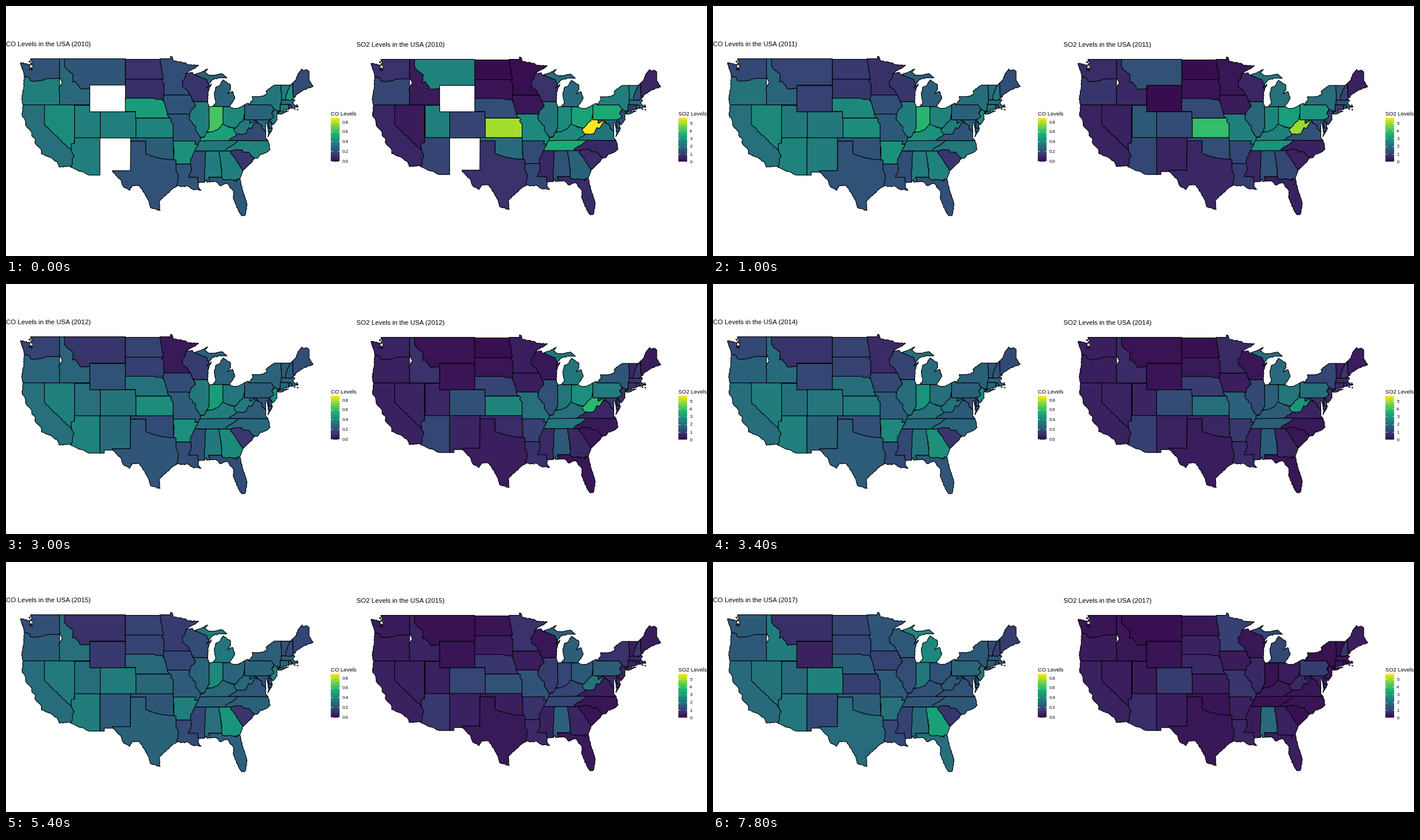
These frames come from a looping animation (1200x429 px, 8000 ms). A matplotlib script:

```python
import matplotlib.pyplot as plt
import numpy as np
from matplotlib.animation import FuncAnimation
from matplotlib.collections import PolyCollection

plt.rcParams["font.family"] = "Liberation Sans"
W, H, DPI = 1200, 429, 100
FRAMES, INTERVAL = 40, 200

# Each year is reached in three even steps, then held until the next slide.
YEARS = [2010, 2011, 2012, 2014, 2015, 2016, 2017, 2018]
STARTS = [5, 11, 17, 23, 29, 34, 40]
SLIDE = 3
KNOTS = [k for s in STARTS for k in (s - SLIDE, s)]
KNOT_YEARS = [y for pair in zip(YEARS, YEARS[1:]) for y in pair]
LEVEL_YEARS = [2010, 2012, 2017.7]

shapes = []  # (outline, CO levels, SO2 levels, first frame)


def roughen(flat):
    """Bend slanted edges a little; the bend depends on place only, so neighbours agree."""
    points = np.reshape(flat, (-1, 2)).astype(float)
    out = []
    for a, b in zip(points, np.roll(points, -1, axis=0)):
        out.append(a)
        if np.abs(a - b).min() > 0.06:
            parts = int(np.ceil(np.hypot(*(a - b)) / 0.3))
            for k in range(1, parts):
                p = a + (b - a) * k / parts
                out.append(p + 0.06 * np.sin([37 * p[0] + 91 * p[1], 83 * p[0] - 29 * p[1]]))
    return np.array(out)


def state(co, so2, *outlines, start=0):
    """Outlines list degrees west and north; later states cover the loose edges of earlier ones."""
    for flat in outlines:
        shapes.append((roughen(flat), co, so2, start))


def box(west, north, east, south):
    return [west, north, east, north, east, south, west, south]


# West
state((42, 31, 26), (20, 8, 6),
      [124, 46.2, 124.1, 44.7, 124.5, 42.9, 124.2, 42, 117.03, 42, 117.03, 46.1, 123.5, 46.25])
state((24, 17, 27), (13, 9, 4),
      [124.7, 48.4, 122.8, 48.1, 123, 47.3, 122.6, 47.7, 122.5, 47.2, 122.2, 48, 122.75, 49, 117.03, 49,
       117.03, 46, 119, 46, 121.2, 45.65, 122.2, 45.55, 122.75, 45.65, 123, 46.15, 124, 46.3, 124.1, 46.9,
       124.7, 48.2],
      [122.75, 48.2, 122.4, 47.95, 122.6, 48.4], [123.1, 48.6, 122.8, 48.65, 122.85, 48.45])
state((35, 35, 33), (9, 8, 8),
      [124.2, 42, 124.4, 40.4, 123.8, 39.7, 123.7, 38.9, 122.5, 37.8, 122.5, 37.3, 121.8, 36.8, 121.9, 36.3,
       120.6, 35.1, 120.6, 34.55, 119.2, 34.1, 118.4, 33.8, 117.4, 33.2, 117.1, 32.55, 114.7, 32.7,
       114, 33.5, 114.5, 35, 119.5, 39, 119.5, 42])
state((47, 43, 37), (6, 9, 7), [120, 42, 120, 39, 114.63, 35, 114.2, 35.2, 114.05, 37, 114.05, 42])
state((32, 29, 40), (6, 14, 5),
      [117.03, 49, 116.05, 49, 113, 46, 112, 44.7, 111.05, 44.5, 111.05, 42, 117.03, 42, 117.03, 44.2,
       117.2, 44.4, 116.5, 45.5, 116.92, 46, 117.03, 46.4])
state((25, 14, 12), (43, 4, 3),
      [116.05, 49, 104.05, 49, 104.05, 45, 111.05, 45, 111.05, 44.5, 112.9, 44.4, 113.9, 45.6, 114.5, 45.5,
       114.3, 46.6, 115.7, 47.45, 116.05, 48])
state((42, 36, 32), (42, 10, 6), [114.05, 42, 111.05, 42, 111.05, 41, 109.05, 41, 109.05, 37, 114.05, 37])
state((42, 44, 38), (19, 21, 11),
      [114.05, 37, 109.05, 37, 109.05, 31.33, 111.07, 31.33, 114.8, 32.5, 114.5, 33, 114.5, 33.9,
       114.15, 34.25, 114.63, 35, 114.7, 36.1, 114.05, 36.2])
state((42, 36, 43), (19, 24, 16), box(109.05, 41, 102.05, 37))
state((10, 26, 8), (0, 4, 4), box(111.05, 45, 104.05, 41), start=STARTS[0])
state((46, 35, 20), (8, 9, 7),
      [109.05, 37, 103, 37, 103.05, 32, 106.6, 32, 106.5, 31.78, 108.2, 31.78, 108.2, 31.33, 109.05, 31.33],
      start=STARTS[0])

# Plains
state((13, 18, 19), (2, 2, 5), box(104.05, 49, 96.6, 45.94))
state((12, 17, 20), (4, 4, 8), box(104.05, 45.94, 96.45, 42.5))
state((55, 37, 28), (22, 20, 10),
      [104.05, 43, 98.5, 43, 97.9, 42.8, 97.2, 42.85, 96.4, 42.5, 95.3, 40, 102.05, 40, 102.05, 41, 104.05, 41])
state((44, 52, 17), (88, 48, 7), box(102.05, 40, 94.62, 37))
state((24, 24, 34), (13, 7, 5),
      [103, 36.5, 103.05, 32, 106.6, 32, 106.5, 31.75, 105, 30.65, 104.5, 29.65, 103.2, 29, 102.7, 29.7,
       101.4, 29.77, 100.7, 29.1, 99.5, 27.5, 99.1, 26.4, 97.2, 25.95, 97.4, 27.3, 95, 29.1, 93.8, 29.7,
       93.5, 31, 94, 33.5, 95, 34.5, 100, 35, 100, 36.5])
state((28, 20, 28), (33, 12, 4),
      [103, 37, 94.62, 37, 94.48, 33.65, 96, 33.75, 97.7, 33.95, 100, 34.56, 100, 36.5, 103, 36.5])
state((22, 3, 25), (3, 6, 18),
      [97.2, 49, 95.15, 49, 95.15, 49.38, 94.8, 49.3, 94.6, 48.7, 92.5, 48.4, 91.4, 48.07, 89.6, 48, 92.1, 46.75,
       91.9, 45, 91.2, 43.5, 96.45, 43.5, 96.45, 45.3, 96.85, 45.6, 96.55, 45.94, 96.85, 47.5])
state((24, 22, 18), (5, 7, 6),
      [96.45, 43.5, 91.2, 43.5, 90.2, 41.8, 91, 40.4, 95.7, 40.4, 95.85, 41, 96.1, 41.7, 96.45, 42.5, 96.6, 43])
state((25, 27, 27), (46, 38, 14),
      [95.8, 40.6, 91.7, 40.6, 91.4, 40.4, 90, 38.7, 89.2, 37.2, 89.3, 36.3, 89.6, 36, 94.4, 36, 94.62, 36.5,
       94.62, 39.1, 95.1, 39.5, 94.9, 39.75, 95.3, 40])

# Great Lakes
state((41, 41, 22), (37, 26, 10),
      [90.65, 42.5, 87.8, 42.5, 87.53, 41.7, 87.4, 39, 87.8, 37.8, 88.3, 37.2, 89.1, 37, 89.5, 37.3, 90.2, 38.3,
       90.15, 38.75, 90.7, 39, 91.5, 40, 91.4, 40.4, 91.1, 41.2, 90.2, 41.8])
state((72, 57, 38), (47, 42, 3),
      [87.53, 41.7, 86.8, 41.75, 84.7, 41.75, 84.7, 39, 86, 37.9, 88, 37.8, 87.5, 38.5, 87.53, 39.35])
state((46, 40, 24), (57, 54, 6),
      [84.8, 41.7, 83.45, 41.73, 82.7, 41.45, 81.7, 41.5, 80.5, 41.98, 80.5, 39.8, 82.2, 38.4, 84.8, 38.9])
state((14, 15, 26), (13, 5, 5),
      [92.1, 46.75, 90.85, 46.95, 90.4, 46.55, 88, 46.2, 87.5, 45.2, 88, 44.55, 87.1, 45.2, 87.7, 44, 87.8, 42.5,
       90.65, 42.5, 91.22, 43.5, 91.9, 44.3, 92.75, 44.75, 92.85, 45.6, 92.3, 46.1])
state((30, 27, 46), (33, 40, 20),
      [86.8, 41.75, 86.2, 42.4, 86.5, 43.6, 86.2, 44.7, 85.5, 44.9, 84.75, 45.8, 83.3, 45, 83.3, 44.3,
       83.9, 43.7, 82.9, 44.05, 82.45, 43, 83.1, 42.2, 83.45, 41.73, 84.8, 41.75],
      [90.4, 46.55, 89, 46.95, 87.8, 47.45, 88.4, 46.9, 87.4, 46.5, 86.5, 46.5, 85, 46.75, 84, 46.1, 85.5, 46.1,
       86.5, 45.9, 87, 45.75, 87.6, 45.1, 88.1, 45.9, 89.1, 46.15])

# South
state((49, 50, 36), (21, 19, 8),
      [94.62, 36.5, 90.15, 36.5, 90.35, 36, 89.7, 36, 90, 35, 90.9, 33, 94.05, 33, 94.05, 33.55, 94.48, 33.65,
       94.45, 35.4])
state((25, 22, 21), (20, 13, 9),
      [94.05, 33, 91, 33, 91, 31.2, 89.7, 31.1, 89.55, 30.2, 89.7, 29.6, 89.1, 29.05, 90, 29.15, 90.6, 29.1,
       91.8, 29.7, 92.3, 29.55, 93.85, 29.7, 93.55, 31.2, 94.05, 32])
state((22, 22, 18), (9, 11, 6),
      [90.3, 35, 87.9, 35, 88.2, 31, 88.4, 30.25, 89.55, 30.2, 89.8, 30.6, 89.75, 31, 91.6, 31, 91, 32.2,
       91.2, 33, 91.1, 33.9])
state((40, 40, 32), (24, 25, 33),
      [88.15, 35, 85.5, 35, 84.9, 31, 87.6, 31, 87.4, 30.6, 87.5, 30.3, 88, 30.25, 88, 30.65, 88.4, 30.3,
       88.45, 31.9])
state((42, 45, 56), (30, 10, 8),
      [85.6, 35, 83, 35, 81.2, 33, 80.9, 32, 81.45, 30.7, 82, 30.5, 84.9, 30.6, 85.05, 31, 85, 32.2, 85.15, 32.8])
state((26, 20, 35), (11, 4, 7),
      [87.6, 31, 85, 31, 84.87, 30.7, 82.2, 30.55, 82.05, 30.35, 82, 30.75, 81.45, 30.7, 80.9, 29, 80.55, 28.3,
       80.05, 26.8, 80.4, 25.25, 81.1, 25.15, 81.8, 26, 82.75, 27.8, 82.65, 28.8, 84, 30.1, 85.3, 29.7,
       86.2, 30.35, 87.5, 30.3, 87.4, 30.6])
state((14, 15, 14), (11, 5, 3),
      [83.1, 35, 82.3, 35.3, 79.7, 35, 78.55, 33.87, 79.2, 33.2, 80.9, 32, 81.4, 32.6, 82.5, 34, 83.3, 34.7])
state((43, 33, 26), (10, 6, 4),
      [84.3, 35, 83.1, 35, 82.3, 35.2, 81, 35.15, 80.8, 34.82, 79.7, 34.8, 78.55, 33.87, 77.95, 33.9, 77.5, 34.4,
       76.5, 34.65, 75.5, 35.25, 75.9, 36.55, 81.7, 36.6, 82.5, 36.4, 84.3, 35.4])
state((56, 43, 24), (46, 39, 6),
      [89.4, 36.4, 83.7, 36.4, 82, 37.2, 82, 38, 82.6, 38.4, 83.7, 38.65, 84.8, 39.1, 85.8, 38.25, 86.8, 37.95,
       88, 37.8, 88.5, 37.1, 89.1, 37])
state((38, 36, 25), (60, 42, 3),
      [90.3, 35, 84.3, 35, 84, 35.4, 82.6, 36, 81.7, 36.6, 88.05, 36.55, 89.4, 36.5, 89.7, 36])

# Atlantic and Northeast
state((33, 26, 22), (30, 15, 8),
      [79.48, 39.72, 75.79, 39.72, 75.7, 38.45, 75.05, 38.45, 75.3, 37.95, 75.9, 37.95, 76.1, 39.3, 76.4, 39.2,
       76.35, 38.05, 77, 38.3, 77.4, 38.8, 79.4, 39.1])
state((21, 28, 24), (37, 10, 5),
      [83.7, 36.6, 75.9, 36.55, 76.4, 37, 76.3, 37.9, 77.1, 38.4, 77.1, 38.9, 77.8, 39.15, 78.35, 39.4,
       79.8, 38.8, 81.5, 38, 82, 37.5],
      [75.95, 37.15, 75.3, 37.95, 75.7, 37.95])
state((39, 41, 26), (100, 73, 10),
      [82, 37.5, 80.3, 37.6, 79.7, 38.55, 79.3, 38.4, 78.35, 39.4, 77.8, 39.15, 78.3, 39.65, 79.5, 39.2,
       79.48, 39.72, 80.52, 39.72, 80.52, 40.6, 80.85, 39.7, 82.2, 38.6, 82.6, 38.4, 82.6, 38.1])
state((30, 20, 20), (30, 15, 10), [75.79, 39.72, 75.45, 39.83, 75.05, 38.45, 75.7, 38.45])
state((38, 31, 26), (42, 28, 3),
      [79.76, 42, 78.9, 42.85, 79.05, 43.25, 77.5, 43.25, 76.2, 43.55, 76.3, 44.1, 74.7, 45, 73.35, 45, 73, 42,
       73.5, 41.3, 73.95, 40.6, 73.9, 41, 75, 41.3, 75.35, 42],
      [74, 40.6, 73.7, 40.9, 71.9, 41.07, 73.5, 40.58])
state((39, 50, 39), (22, 14, 5),
      [74.7, 41.36, 73.9, 41, 74.2, 40.6, 74.1, 39.75, 74.9, 38.95, 75.5, 39.5, 75.3, 40.5])
state((30, 28, 31), (60, 43, 17),
      [80.52, 42, 79.76, 42.25, 79.76, 42, 75.35, 42, 74.7, 41.36, 75.2, 40.7, 74.75, 40.2, 75.4, 39.8,
       75.79, 39.72, 80.52, 39.72])
state((40, 27, 21), (42, 11, 3),
      [73.35, 45, 71.5, 45, 72, 43, 72.45, 42.73, 73.27, 42.75, 73.25, 43.6])
state((50, 28, 17), (22, 15, 14),
      [71.5, 45, 71.1, 45.3, 70.9, 43, 71.3, 42.7, 72.45, 42.73, 72.3, 43.6])
state((21, 23, 17), (9, 6, 7),
      [71.08, 45.3, 70.4, 45.8, 70, 46.7, 69.2, 47.45, 68.9, 47.2, 68.3, 47.35, 67.8, 47.07, 67.8, 45.7,
       67, 44.8, 68.8, 44.3, 70.2, 43.6, 70.7, 43.07, 70.98, 43.4])
state((32, 32, 25), (32, 15, 5),
      [73.27, 42.75, 71.3, 42.7, 70.85, 42.87, 70.6, 42.65, 71, 42.3, 70.6, 41.95, 70.05, 41.8, 70.2, 42.07,
       69.95, 41.7, 71.15, 41.5, 71.38, 42.02, 73.5, 42.05],
      [70.8, 41.4, 70.5, 41.4, 70.65, 41.3], [70.2, 41.3, 69.95, 41.3, 70.05, 41.2])
state((25, 26, 33), (30, 20, 5), [71.8, 42.02, 71.38, 42.02, 71.2, 41.5, 71.85, 41.32])
state((40, 32, 28), (16, 14, 4), [73.5, 42.05, 71.8, 42.02, 71.85, 41.32, 73.65, 41, 73.5, 41.3])


def shade(t):
    """Viridis with muted red and blue, reaching its pure yellow at the top."""
    t = np.asarray(t, float)
    rgba = plt.get_cmap("viridis")(t)
    muted = rgba[..., :3] * [0.8, 0.98, 0.86] + [0, 0.02, 0]
    pure = (t ** 3)[..., None]
    rgba[..., :3] = muted * (1 - pure) + rgba[..., :3] * pure
    return rgba


fig = plt.figure(figsize=(W / DPI, H / DPI), dpi=DPI, facecolor="white")
ax = fig.add_axes([0, 0, 1, 1])


def label(x, baseline, text, px):
    return ax.text(x, baseline, text, fontsize=px * 72 / DPI, va="baseline", color="black")


class Panel:
    def __init__(self, gas, column, left, top, scale, bar_x, ticks):
        self.gas = gas
        self.levels = [s[column] for s in shapes]
        outlines = [np.column_stack([left + (124.7 - p[:, 0]) * 8.68 * scale,
                                     top + (49 - p[:, 1]) * 11.3 * scale])
                    for p, *_ in shapes]
        self.states = PolyCollection(outlines, linewidths=0.8, joinstyle="round")
        ax.add_collection(self.states)
        self.title = label(left - 25, top - 21.8, "", 11.3)
        label(bar_x, 188.3, f"{gas} Levels", 9.4)
        ax.imshow(shade(np.linspace(1, 0, 128))[:, None], aspect="auto",
                  extent=[bar_x, bar_x + 15, 267.5, 193])
        for text, y in ticks:
            for x in (bar_x, bar_x + 12):
                ax.plot([x, x + 3], [y, y], color="white", lw=0.5, solid_capstyle="butt")
            label(bar_x + 19.3, y + 2.8, text, 7.6)

    def draw(self, i):
        now = np.interp(i, KNOTS, KNOT_YEARS)
        face = shade(np.array([np.interp(now, LEVEL_YEARS, lv) for lv in self.levels]) / 100)
        visible = np.array([s[3] <= i for s in shapes], float)
        face[:, 3] = visible
        self.states.set_facecolor(face)
        self.states.set_edgecolor(np.outer(visible, [0, 0, 0, 1]))
        year = YEARS[np.searchsorted(STARTS, i, side="right")]
        self.title.set_text(f"{self.gas} Levels in the USA ({year})")
        return self.states, self.title


panels = [
    Panel("CO", 1, 25, 90.5, 1, 556, [(f"{k / 5:.1f}", 266 - 16.8 * k) for k in range(5)]),
    Panel("SO2", 2, 625, 91.5, 0.99, 1151, [(str(k), 267 - 13.2 * k) for k in range(6)]),
]
ax.set(xlim=(0, W), ylim=(H, 0))
ax.axis("off")


def update(i):
    return [artist for panel in panels for artist in panel.draw(i)]


anim = FuncAnimation(fig, update, frames=FRAMES, interval=INTERVAL, repeat=True, repeat_delay=0)
plt.show()
```
